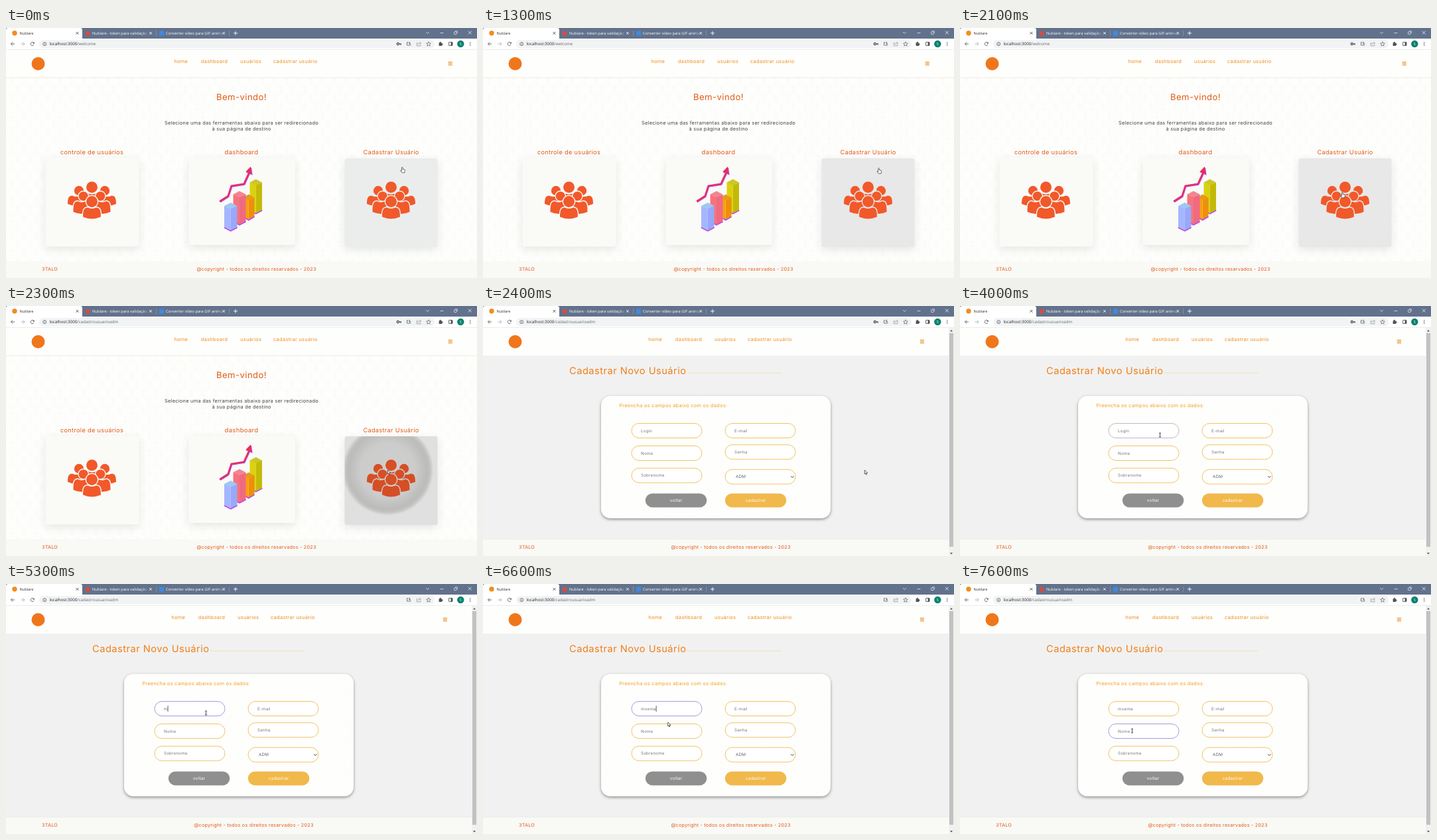
These frames come from a looping animation (710x378 px, 8 s). An HTML page with a canvas:

```html
<!DOCTYPE html>
<html lang="pt">
<head>
<meta charset="utf-8">
<title>Nublare</title>
<style>
html, body { margin: 0; width: 100%; height: 100%; overflow: hidden; background: #fff; }
canvas { display: block; width: 710px; height: 378px; }
</style>
</head>
<body>
<canvas id="stage"></canvas>
<script>
const W = 710, H = 378, LOOP = 8000, STEP = 100;
const SITE = 'Inter, sans-serif', UI = '"Open Sans", sans-serif';
const AMBER = '#ee8f22', ORANGE = '#e25a14', PEOPLE = '#f1592a';
const canvas = document.getElementById('stage');
const dpr = window.devicePixelRatio || 1;
canvas.width = W * dpr;
canvas.height = H * dpr;
const c = canvas.getContext('2d');
c.textRendering = 'geometricPrecision';

// Pointer hotspot: time, x, y
const TRACK = [
  [0, 596.5, 210], [1200, 596.5, 210], [2100, 575.5, 248], [2800, 575, 248],
  [3600, 302.5, 194.5], [3900, 302.5, 194.5], [4000, 301.5, 195], [6400, 301.5, 195],
  [6600, 278.7, 209], [7200, 259.5, 222], [8000, 259.5, 222]
];

const FIELDS = [
  { name: 'Login', x: 223.5, y: 177 },
  { name: 'Nome', x: 223.5, y: 211 },
  { name: 'Sobrenome', x: 223.5, y: 244.7 },
  { name: 'E-mail', x: 364.5, y: 177 },
  { name: 'Senha', x: 364.5, y: 209.3 },
  { name: 'ADM', x: 364.5, y: 246.7, select: true }
];
const FW = 107, FH = 23;
const TYPED = 'moema';

const smooth = u => u * u * (3 - 2 * u);
const lerp = (a, b, u) => a + (b - a) * u;

function pointerAt(t) {
  let i = 0;
  while (i < TRACK.length - 2 && TRACK[i + 1][0] <= t) i++;
  const [t0, x0, y0] = TRACK[i], [t1, x1, y1] = TRACK[i + 1];
  const u = smooth(Math.min(1, (t - t0) / (t1 - t0)));
  return { x: lerp(x0, x1, u), y: lerp(y0, y1, u) };
}

function rect(x, y, w, h, fill) {
  c.fillStyle = fill;
  c.fillRect(x, y, w, h);
}

function round(x, y, w, h, r, fill, stroke, lw = 1) {
  c.beginPath();
  c.roundRect(x, y, w, h, r);
  if (fill) { c.fillStyle = fill; c.fill(); }
  if (stroke) { c.strokeStyle = stroke; c.lineWidth = lw; c.stroke(); }
}

function disc(x, y, r, fill) {
  c.beginPath();
  c.arc(x, y, r, 0, Math.PI * 2);
  c.fillStyle = fill;
  c.fill();
}

function line(pts, color, lw = 0.9, closed = false) {
  c.beginPath();
  for (let i = 0; i < pts.length; i += 2) c.lineTo(pts[i], pts[i + 1]);
  if (closed) c.closePath();
  c.strokeStyle = color;
  c.lineWidth = lw;
  c.stroke();
}

function poly(pts, fill) {
  c.beginPath();
  for (let i = 0; i < pts.length; i += 2) c.lineTo(pts[i], pts[i + 1]);
  c.closePath();
  c.fillStyle = fill;
  c.fill();
}

function text(str, x, y, size, color, align = 'left', family = SITE) {
  c.font = size + 'px ' + family;
  c.letterSpacing = family === SITE ? size * 0.035 + 'px' : '0px';
  c.textAlign = align;
  c.fillStyle = color;
  c.fillText(str, x, y);
  return c.measureText(str).width;
}

function shadow(color, blur, dy) {
  c.shadowColor = color;
  c.shadowBlur = blur * dpr;
  c.shadowOffsetY = dy * dpr;
}

// Faint lattice of overlapping circles
const lattice = new Path2D();
for (let row = 0; row < 27; row++) {
  for (let col = 0; col < 42; col++) {
    const x = col * 18 + (row % 2) * 9, y = 28 + row * 13;
    lattice.moveTo(x + 10.4, y);
    lattice.arc(x, y, 10.4, 0, Math.PI * 2);
  }
}

function pattern(alpha) {
  c.strokeStyle = `rgba(90,90,80,${alpha})`;
  c.lineWidth = 0.6;
  c.stroke(lattice);
}

function cross(x, y, r, color) {
  line([x - r, y - r, x + r, y + r], color);
  line([x - r, y + r, x + r, y - r], color);
}

function tabTitle(str, x, end) {
  const g = c.createLinearGradient(end - 9, 0, end + 2, 0);
  g.addColorStop(0, '#fff');
  g.addColorStop(1, 'rgba(255,255,255,0)');
  text(str, x, 9.8, 5.8, g, 'left', UI);
}

function browser(path, showKey) {
  rect(0, 0, W, 17, '#62728c');
  round(0, 0, 115, 20, 3, '#fff');
  rect(0, 16, W, 17, '#fff');
  disc(13, 7.8, 3.7, '#f28c1e');
  text('Nublare', 20.5, 9.8, 5.6, '#333', 'left', UI);
  cross(107.5, 7.8, 1.9, '#444');
  round(120, 5, 6, 6, 0, '#e0483c');
  tabTitle('Nublare - token para validação do', 130, 214);
  cross(218, 7.8, 1.9, '#fff');
  line([226.5, 4, 226.5, 12], '#8e9bb0', 0.7);
  round(231, 4.5, 7, 7, 0, '#3f8ae0');
  tabTitle('Converter vídeo para GIF animado', 241, 327);
  cross(328.3, 7.8, 1.9, '#fff');
  line([336.5, 4, 336.5, 12], '#8e9bb0', 0.7);
  line([343, 7.8, 349, 7.8], '#fff');
  line([346, 4.8, 346, 10.8], '#fff');

  line([633, 6, 635.5, 8.4, 638, 6], '#e4e8ee', 0.8);
  line([654.5, 7.5, 659.5, 7.5], '#e4e8ee', 0.8);
  round(675.5, 5.8, 3.7, 3.7, 0.7, null, '#e4e8ee', 0.8);
  line([677, 4.6, 680.4, 4.6, 680.4, 8], '#e4e8ee', 0.7);
  cross(699.3, 7, 2.4, '#e4e8ee');

  const ink = '#5b5f64';
  line([13, 24, 7.5, 24], ink);
  line([10, 21.4, 7.4, 24, 10, 26.6], ink);
  line([22.5, 24, 28, 24], '#aeb1b5');
  line([25.5, 21.4, 28.1, 24, 25.5, 26.6], '#aeb1b5');
  c.beginPath();
  c.arc(39.8, 24, 2.6, 0.5, 5.6);
  c.strokeStyle = ink;
  c.stroke();
  poly([42.8, 21, 42.8, 23.8, 40, 23.8], ink);

  round(50, 18, 596, 12.5, 6.2, '#f1f3f4');
  round(55.7, 21.6, 5, 5, 2.5, null, ink, 0.8);
  line([58.2, 23.8, 58.2, 25.6], ink, 0.8);
  line([58.2, 22.5, 58.2, 23.1], ink, 0.8);
  const w = text('localhost:3000', 65.5, 26.2, 6.2, '#222', 'left', UI);
  text(path, 65.5 + w, 26.2, 6.2, '#65696e', 'left', UI);

  if (showKey) {
    round(589.2, 22.4, 3.2, 3.2, 1.6, null, '#44474b', 1.2);
    line([592.4, 24, 596, 24], '#44474b', 1.2);
    line([595, 24, 595, 25.8], '#44474b', 1);
  }
  line([607, 21.7, 604.5, 21.7, 604.5, 26, 609.8, 26, 609.8, 24.6], ink, 0.8);
  line([608.5, 20.8, 608.5, 24], ink, 0.8);
  line([607, 22.8, 608.5, 24.2, 610, 22.8], ink, 0.8);
  line([620.5, 22.3, 619.2, 22.3, 619.2, 26.8, 625, 26.8, 625, 25], '#8a8d91', 0.7);
  line([620.8, 25, 622, 22.8, 625.4, 22.8], '#8a8d91', 0.7);
  line([623.7, 21, 625.5, 22.8, 623.7, 24.6], '#8a8d91', 0.7);
  const star = [];
  for (let i = 0; i < 10; i++) {
    const a = -Math.PI / 2 + i * Math.PI / 5, r = i % 2 ? 1.6 : 3.6;
    star.push(637 + r * Math.cos(a), 24.3 + r * Math.sin(a));
  }
  line(star, ink, 0.7, true);
  rect(652.6, 22.3, 4.6, 4.7, '#4e5256');
  disc(654.7, 21.8, 1.1, '#4e5256');
  disc(657.6, 24.6, 1.1, '#4e5256');
  round(667.6, 21.4, 5.4, 5.2, 0.4, null, '#4e5256', 0.9);
  rect(670.6, 21.4, 2.4, 5.2, '#4e5256');
  disc(685.3, 24, 5.2, '#00806f');
  text('S', 685.3, 26, 5.6, '#fff', 'center', UI);
  for (let i = -1; i < 2; i++) disc(699.7, 24 + i * 2.3, 0.75, ink);
  rect(0, 32.3, W, 0.7, '#e3e4e6');
}

// Shared header and footer; the form page sits 4 px further left
function frame(dx, width) {
  rect(0, 33, width, 42, '#fefefd');
  disc(48.5, 54, 10, '#f0761b');
  [['home', 253.3], ['dashboard', 293.8], ['usuários', 353], ['cadastrar usuário', 403]]
    .forEach(([s, x]) => text(s, x + dx, 52.6, 7.5, AMBER));
  const mx = dx ? 658.8 : 666.6;
  for (let i = -1; i < 2; i++) rect(mx, 53.2 + i * 2.2, 6.2, 1.1, AMBER);
  rect(0, 352.5, width, 26, '#f9f9f6');
  text('3TALO', 54, 367.1, 7.2, ORANGE);
  text('@copyright - todos os direitos reservados - 2023', 377.5 + dx, 367.1, 7.2, ORANGE, 'center');
}

function person(x, headY, r, bx, half, top, bottom, gap) {
  c.lineWidth = 2.8;
  c.strokeStyle = gap;
  c.fillStyle = PEOPLE;
  c.beginPath();
  c.moveTo(bx - half, bottom - 3);
  c.bezierCurveTo(bx - half, top + 3, bx - half * 0.85, top, bx - half * 0.45, top);
  c.quadraticCurveTo(bx, top + 3, bx + half * 0.45, top);
  c.bezierCurveTo(bx + half * 0.85, top, bx + half, top + 3, bx + half, bottom - 3);
  c.quadraticCurveTo(bx, bottom + 3, bx - half, bottom - 3);
  c.stroke();
  c.fill();
  c.beginPath();
  c.arc(x, headY, r, 0, Math.PI * 2);
  c.stroke();
  c.fill();
}

function people(x, bg) {
  for (const s of [-1, 1]) person(x + s * 19.5, 246, 7.2, x + s * 23.5, 13, 253.5, 269, bg);
  person(x, 240.8, 8.5, x, 13, 250, 268, bg);
  for (const s of [-1, 1]) person(x + s * 12.8, 254.2, 7, x + s * 15.5, 12.5, 262, 281, bg);
  person(x, 262.5, 8.5, x, 13.5, 271.5, 288.5, bg);
}

function bar(x, w, top, bottom, lid, left, right) {
  const m = x + w / 2, e = x + w;
  line([x, bottom - 4.5, m, bottom + 0.5, e, bottom - 4.5], '#b94be6', 2.4);
  poly([x, top + 5, m, top + 9, m, bottom, x, bottom - 5], left);
  poly([m, top + 9, e, top + 5, e, bottom - 5, m, bottom], right);
  poly([x, top + 5, m, top, e, top + 5, m, top + 9.5], lid);
}

function chart() {
  bar(367.5, 18.5, 228.5, 280, '#cdc62a', '#dad20c', '#c3ba08');
  bar(357, 17.5, 251.5, 289.5, '#e89a1c', '#f6a012', '#ee8f0a');
  bar(342.5, 19, 246.5, 297, '#f28593', '#f6747c', '#f06a80');
  bar(329, 19.5, 264, 306, '#a0c6f6', '#a6b6fe', '#98a8fa');
  const path = [322, 262, 334.5, 254, 339.5, 238.5, 358.5, 235.5, 367, 217];
  c.lineJoin = 'round';
  line(path.map((v, i) => i % 2 ? v + 1 : v + 0.9), '#b446d8', 2.3);
  line(path, '#ee2c55', 2.1);
  c.lineJoin = 'miter';
  poly([370, 210.7, 371.6, 222.6, 362.2, 218.3], '#b446d8');
  poly([368.7, 209.5, 370.3, 221, 361.2, 217.5], '#ee2c55');
}

function ripple(r) {
  c.save();
  c.beginPath();
  c.roundRect(510.5, 197, 140, 134, 3);
  c.clip();
  rect(510, 196, 142, 136, 'rgba(0,0,0,0.035)');
  const g = c.createRadialGradient(575.5, 248, 0, 575.5, 248, r);
  [[0, 0.08], [0.6, 0.095], [0.76, 0.14], [0.86, 0.17], [0.92, 0.14], [1, 0]]
    .forEach(([p, a]) => g.addColorStop(p, `rgba(8,8,0,${a})`));
  rect(510, 196, 142, 136, g);
  c.restore();
}

function welcome(t) {
  rect(0, 33, W, H, '#fefefd');
  pattern(0.035);
  frame(0, W);
  rect(0, 74.6, W, 0.9, '#f3e9d6');
  text('Bem-vindo!', 355, 109.3, 13.1, ORANGE, 'center');
  text('Selecione uma das ferramentas abaixo para ser redirecionado', 355, 145.6, 7.4, '#444', 'center');
  text('à sua página de destino', 355, 154.8, 7.4, '#444', 'center');
  text('controle de usuários', 129.5, 190.8, 9.2, ORANGE, 'center');
  text('dashboard', 355, 190.8, 9.5, ORANGE, 'center');
  text('Cadastrar Usuário', 580.5, 190.8, 9.2, ORANGE, 'center');

  const u = Math.max(0, Math.min(1, (t - 400) / 400));
  const bg = `rgb(${lerp(235, 232, u)},${lerp(237, 232, u)},${lerp(237, 232, u)})`;
  shadow('rgba(60,60,50,0.12)', 13, 4);
  round(59.5, 196, 141, 134.5, 4, '#fafaf7');
  round(275.5, 196, 160.5, 132, 4, '#fafaf7');
  round(510.5, 197, 140, 134, 3, bg);
  shadow('transparent', 0, 0);
  people(129.5, '#fafaf7');
  chart();
  people(580.5, bg);
  if (t >= 2200) ripple(t < 2300 ? 36 : 69);
}

function caret(x, y) {
  rect(x, y - 4.5, 0.8, 9, '#333');
}

function field(f, t, hover) {
  const focus = f.name === 'Login' ? t >= 5000 && t < 7100 : f.name === 'Nome' && t >= 7100;
  const edge = focus ? '#a29ddd' : hover ? '#bcbcc4' : '#efc465';
  round(f.x + 0.5, f.y + 0.5, FW - 1, FH - 1, 11, '#fff', edge);
  const x = f.x + 14.5, mid = f.y + FH / 2, base = mid + 2.2;
  if (f.select) {
    text(f.name, x + 2, base, 6.3, '#666');
    line([464, mid - 1, 466.3, mid + 1.3, 468.6, mid - 1], '#444', 1);
    return;
  }
  const count = f.name !== 'Login' || t < 5300 ? 0 : t < 5500 ? 1 : t < 5700 ? 3 : t < 6200 ? 4 : 5;
  const w = count ? text(TYPED.slice(0, count), x, base, 6.2, '#757575') : 0;
  if (!count) text(f.name, x, base, 6.2, '#757575');
  const since = t - (f.name === 'Nome' ? 7100 : t >= 6200 ? 6200 : t >= 5700 ? 5700 : 5000);
  if (focus && since % 1000 < 500) caret(x + w, mid);
}

function form(t, over) {
  rect(0, 33, W, H, '#f1f1f1');
  frame(-4, 702);
  rect(0, 352, 702, 0.7, '#e8e8e4');
  text('Cadastrar Novo Usuário', 130, 103, 14.6, '#f07f16');
  rect(307, 100.6, 142.5, 0.8, '#efd6a9');

  shadow('rgba(0,0,0,0.4)', 4, 1.8);
  round(178, 136, 346, 185, 14, '#fefefc');
  shadow('transparent', 0, 0);
  c.save();
  c.beginPath();
  c.roundRect(178, 136, 346, 185, 14);
  c.clip();
  pattern(0.02);
  c.restore();

  text('Preencha os campos abaixo com os dados:', 205.3, 153.4, 7.45, '#f5a128');
  FIELDS.forEach(f => field(f, t, f === over));
  round(244.8, 283.4, 92.5, 21, 10.5, '#8e8f8e');
  round(364.8, 283.4, 92.5, 21, 10.5, '#f1b84b');
  text('voltar', 291, 295.6, 6.4, '#fff', 'center');
  text('cadastrar', 411, 295.6, 6.4, '#fff', 'center');

  rect(702, 33, 8, H - 33, '#f1f1f1');
  rect(703, 41, 6, 323, '#c1c1c1');
  poly([704, 38.5, 708, 38.5, 706, 36], '#555');
  poly([704, 373, 708, 373, 706, 375.5], '#555');
}

function arrow({ x, y }) {
  const p = [0, 0, 0, 6, 1.4, 4.8, 2.3, 7, 3.3, 6.6, 2.4, 4.5, 4.3, 4.4]
    .map((v, i) => v + (i % 2 ? y : x));
  poly(p, '#fff');
  line(p, '#222', 0.7, true);
}

function hand({ x, y }) {
  c.save();
  c.translate(x, y);
  c.beginPath();
  c.moveTo(0, 1);
  c.quadraticCurveTo(0.8, -0.6, 1.6, 1);
  c.lineTo(1.6, 3.4);
  c.lineTo(4.4, 4);
  c.quadraticCurveTo(5, 4.3, 4.9, 5.4);
  c.lineTo(4.2, 8.8);
  c.lineTo(0.6, 8.8);
  c.lineTo(-1.8, 5.4);
  c.quadraticCurveTo(-1.2, 4.4, 0, 5.8);
  c.closePath();
  c.fillStyle = '#fff';
  c.fill();
  c.strokeStyle = '#444';
  c.lineWidth = 0.8;
  c.stroke();
  c.restore();
}

function ibeam({ x, y }) {
  line([x, y - 3, x, y + 3], '#222', 0.8);
  for (const s of [-3, 3]) line([x - 1.6, y + s, x + 1.6, y + s], '#222', 0.7);
}

function draw(t) {
  c.setTransform(dpr, 0, 0, dpr, 0, 0);
  const p = pointerAt(t);
  const onForm = t >= 2400;
  const over = onForm && FIELDS.find(f =>
    p.x > f.x && p.x < f.x + FW && p.y > f.y && p.y < f.y + FH);
  if (onForm) form(t, over); else welcome(t);
  browser(t < 2300 ? '/welcome' : '/cadastrousuarioadm', t < 5300);
  if (t < 2300) hand(p);
  else if (over && !over.select) ibeam(p);
  else arrow(p);
}

const start = performance.now();
function tick() {
  const t = (performance.now() - start) % LOOP;
  draw(Math.floor(t / STEP) * STEP);
  requestAnimationFrame(tick);
}
tick();
</script>
</body>
</html>
```
